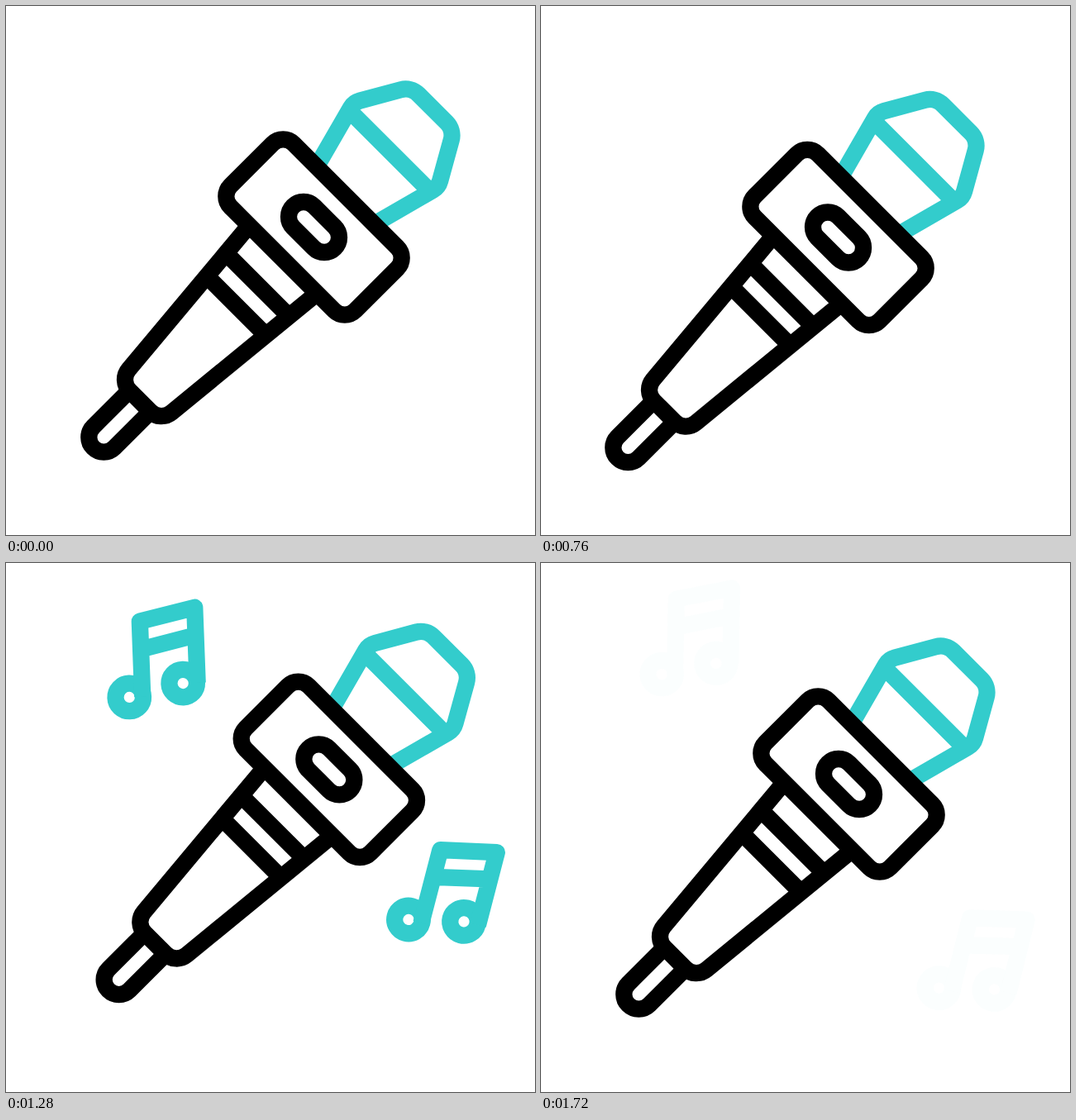
An HTML page that plays this animation: 640x640 px, repeating every 2 s.

```html
<!DOCTYPE html>
<html lang="en">
<head>
<meta charset="utf-8">
<title>Microphone</title>
<style>
  html, body { margin: 0; width: 100%; height: 100%; overflow: hidden; background: #fff; }
  svg { display: block; width: 100%; height: 100%; }
  path, rect, circle { fill: none; stroke: #000; stroke-width: 20.3; stroke-linejoin: round; }
  .teal { stroke: #3cc; }
</style>
</head>
<body>
<svg viewBox="0 0 640 640">
  <defs>
    <g id="note">
      <circle class="teal" cx="-32.75" cy="7.25" r="16.75"/>
      <circle class="teal" cx="32.75" cy="-7.25" r="16.75"/>
      <path class="teal" d="M-16.75 7.25V-84.1L50.25 -98.4V-7.25M-16.75 -50.2L50.25 -64.9"/>
    </g>
  </defs>
  <use id="noteLeft" href="#note"/>
  <use id="noteRight" href="#note"/>
  <g id="mic">
    <path class="teal" d="M-49.4 -54L-70.7 -133.6A18 18 0 0 1 -68.8 -147.3L-43.1 -192A22 22 0 0 1 -24 -203H24A22 22 0 0 1 43.1 -192L68.5 -147.3A18 18 0 0 1 70.3 -133.6L49 -54M-70 -130H70"/>
    <path d="M-56.7 54L-36.6 280.3A19 19 0 0 0 -17.7 297.6H17.7A19 19 0 0 0 36.8 280.3L59.3 54"/>
    <path d="M-53 97.5H55M-49 133.5H51"/>
    <path d="M-18 297.6V359.5A18 18 0 0 0 18 359.5V297.6"/>
    <rect x="-106.7" y="-54" width="213.4" height="108" rx="18"/>
    <rect x="-35.7" y="-18" width="71.4" height="36" rx="18"/>
  </g>
</svg>
<script>
const LOOP = 2000, STEP = 40, REST = 1720;
const byId = id => document.getElementById(id);
const clamp = x => Math.min(1, Math.max(0, x));
const ramp = (t, from, to) => clamp((t - from) / (to - from));
const mix = (a, b, k) => a + (b - a) * k;

// Cubic from 0 to 1 with the given starting slope, coming to rest at the end
const settle = (x, slope) => x * (slope + x * (3 - 2 * slope + x * (slope - 2)));

// Travel along the mic's axis: back, forward past rest, and home
function micOffset(t) {
  if (t < 600) return mix(0, -63, settle(ramp(t, 0, 400), 0.82));
  if (t < 1000) return mix(-63, 32.3, settle(ramp(t, 600, 1000), 1.2));
  return mix(32.3, 0, settle(ramp(t, 1000, REST), 0.66));
}

// Keys: time, x, y, angle
const notes = [
  { el: byId("noteLeft"), fadeOut: [1342, 1725],
    keys: [[840, 190, 222, -9], [1120, 187, 177, -5], [1400, 177.75, 136.75, 0], [REST, 179, 128, 1]] },
  { el: byId("noteRight"), fadeOut: [1400, 1725],
    keys: [[840, 520, 342, 26], [1120, 520.7, 401, 21.3], [1400, 520.3, 456.4, 9.5], [REST, 515, 515, 14]] }
];

function poseAt(keys, t) {
  const i = Math.max(1, keys.findIndex(key => key[0] >= t));
  const [a, b] = [keys[i - 1], keys[i]];
  const k = ramp(t, a[0], b[0]);
  return a.map((v, j) => mix(v, b[j], k));
}

function draw(now) {
  const t = Math.min(REST, Math.floor(now % LOOP / STEP) * STEP);
  const d = micOffset(t);
  byId("mic").setAttribute("transform", `translate(${372.5 + d} ${267.5 - 0.962 * d}) rotate(45)`);
  for (const { el, fadeOut, keys } of notes) {
    const [, x, y, angle] = poseAt(keys, t);
    el.setAttribute("transform", `translate(${x} ${y}) rotate(${angle})`);
    el.setAttribute("opacity", ramp(t, 840, 1000) * (1 - ramp(t, ...fadeOut)));
  }
}

let start;
function tick(now) {
  start ??= now;
  draw(now - start);
  requestAnimationFrame(tick);
}
draw(0);
requestAnimationFrame(tick);
</script>
</body>
</html>
```
